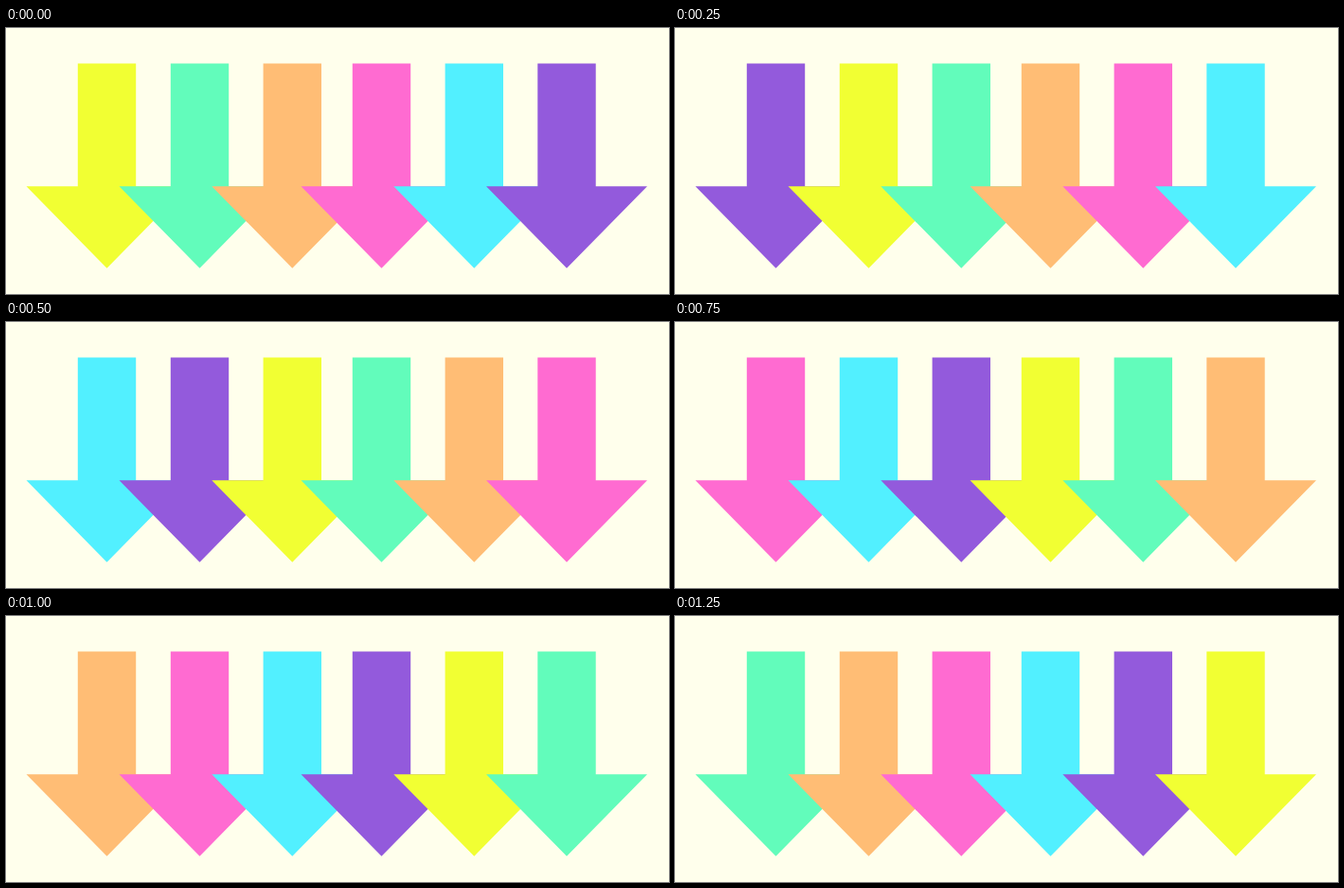
These frames come from a looping animation (700 px wide and 281 px high, 1500 ms). An HTML page:

```html
<!DOCTYPE html>
<html lang="en">
<head>
<meta charset="utf-8">
<title>Colour-cycling arrows</title>
<style>
  html, body { margin: 0; width: 100%; height: 100%; overflow: hidden; background: #ffffec; }
  svg { display: block; }
</style>
</head>
<body>
<svg width="700" height="281" viewBox="0 0 700 281"></svg>
<script>
const STEP = 250;
const COLORS = ['#f1ff33', '#62fcbb', '#ffbd75', '#ff6bd1', '#52f0ff', '#935adc'];
const CENTERS = [106.5, 204.5, 302.3, 396.5, 494.3, 592];
const ARROW = 'M-30.7 37.5H30.7V167.3H85L0 253.7L-85 167.3H-30.7Z';

const svg = document.querySelector('svg');
const arrows = CENTERS.map(x => {
  const path = document.createElementNS('http://www.w3.org/2000/svg', 'path');
  path.setAttribute('d', ARROW);
  path.setAttribute('transform', `translate(${x} 0)`);
  return svg.appendChild(path);
});

// Every step hands each colour to the next arrow on the right.
function draw(time) {
  const n = COLORS.length;
  const shift = Math.floor(time / STEP) % n;
  arrows.forEach((arrow, i) => arrow.setAttribute('fill', COLORS[(i - shift + n) % n]));
}

function tick() {
  draw(performance.now());
  requestAnimationFrame(tick);
}
tick();
</script>
</body>
</html>
```
